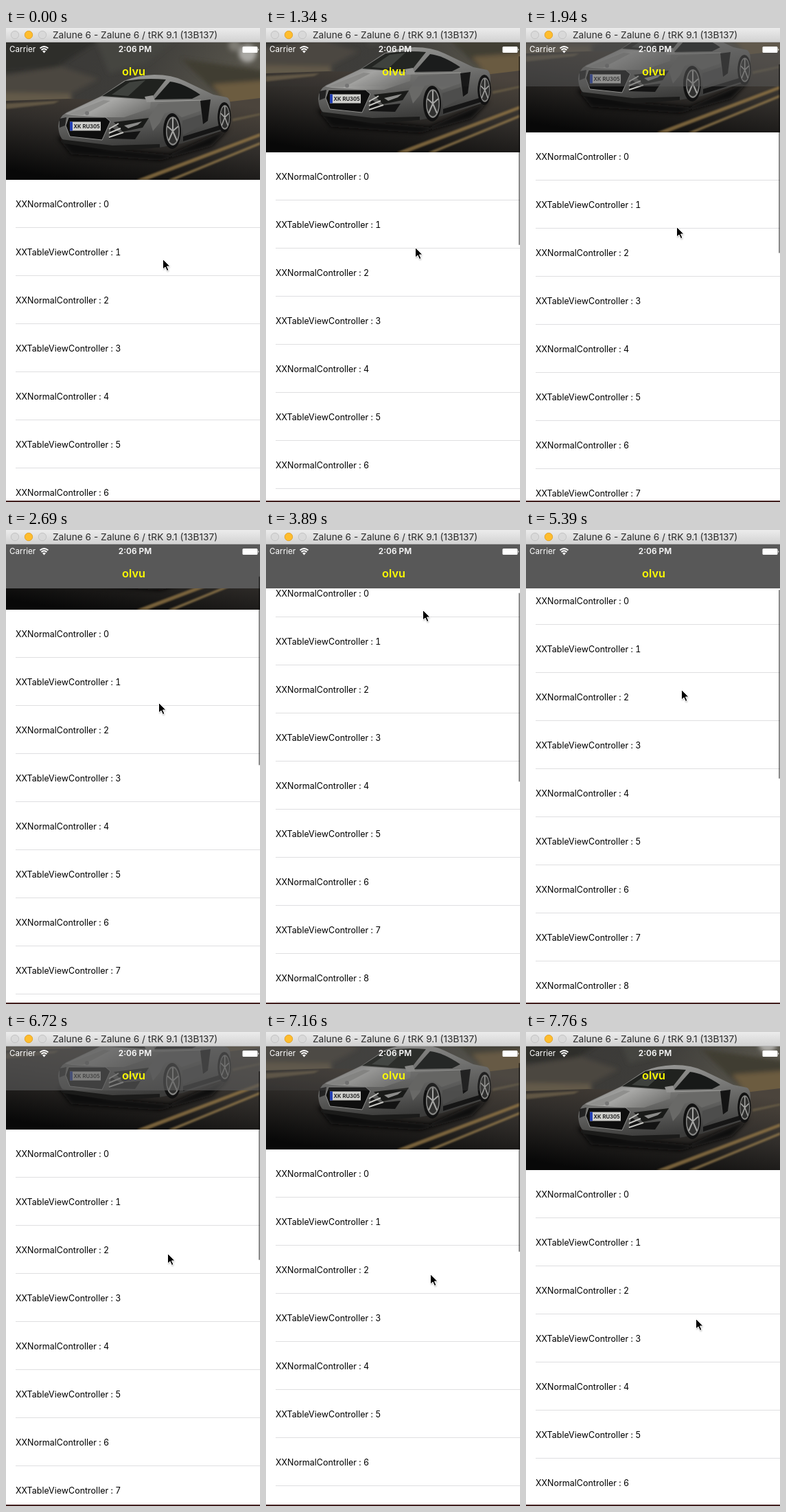
An HTML page for the animation above (8000 ms loop, 370 by 690 pixels).

```html
<!DOCTYPE html>
<html lang="en">
<head>
<meta charset="utf-8">
<title>Fading navigation bar</title>
<style>
  html, body { margin: 0; width: 100%; height: 100%; overflow: hidden; background: #fff; }
  svg { display: block; width: 370px; height: 690px; font-family: Inter, Roboto, sans-serif; }
  #rows { font-size: 12.5px; font-feature-settings: "tnum"; }
</style>
</head>
<body>
<svg viewBox="0 0 370 690">
  <defs>
    <linearGradient id="chrome" x2="0" y2="1"><stop stop-color="#ececec"/><stop offset="1" stop-color="#d1d1d1"/></linearGradient>
    <linearGradient id="hill" x2="1" y2=".3"><stop stop-color="#3a3937"/><stop offset=".5" stop-color="#3d3c39"/><stop offset="1" stop-color="#5c594f"/></linearGradient>
    <linearGradient id="road" x1=".75" y1="0" x2=".25" y2="1"><stop stop-color="#4b443c"/><stop offset=".45" stop-color="#302d2a"/><stop offset="1" stop-color="#080808"/></linearGradient>
    <linearGradient id="paint" x2=".25" y2="1"><stop stop-color="#a0a09e"/><stop offset=".45" stop-color="#777775"/><stop offset="1" stop-color="#3c3c3b"/></linearGradient>
    <linearGradient id="hood" x2="1" y2=".5"><stop stop-color="#6f6f6e"/><stop offset=".5" stop-color="#a9a9a7"/><stop offset="1" stop-color="#777775"/></linearGradient>
    <filter id="soft" x="-20%" y="-20%" width="140%" height="140%"><feGaussianBlur stdDeviation="3"/></filter>
    <filter id="slight" x="-20%" y="-20%" width="140%" height="140%"><feGaussianBlur stdDeviation=".8"/></filter>
    <clipPath id="photo"><path d="M0 21H370V221H0Z"/></clipPath>
    <g id="wheel">
      <ellipse rx="13" ry="26" fill="#111"/>
      <ellipse cx="1" rx="10" ry="21" fill="#858583"/>
      <ellipse cx="1" rx="8.5" ry="18.5" fill="#30302f"/>
      <path d="M1 0V-19M1 0 9-7M1 0 7 14M1 0-5 14M1 0-7-7" stroke="#a5a5a3" stroke-width="2"/>
    </g>
  </defs>

  <path d="M0 0H370V690H0Z" fill="#fff"/>
  <g id="scroll">
    <g clip-path="url(#photo)">
      <path d="M0 21H370V221H0Z" fill="url(#hill)"/>
      <g filter="url(#soft)">
        <path d="M-5 15H140L75 57-5 66Z" fill="#2f2e2c"/>
        <path d="M-5 70 80 56 135 74 90 98-5 94Z" fill="#4b4740"/>
        <path d="M130 15H250L205 52 150 66Z" fill="#45443f"/>
        <path d="M255 45 375 62V102L310 98Z" fill="#413c30"/>
        <path d="M300 82 380 76V108L325 112Z" fill="#6c5b41"/>
        <circle cx="352" cy="37" r="13" fill="#aaa9a5"/>
        <circle cx="333" cy="25" r="9" fill="#7d7a73"/>
        <path d="M-5 94 95 96V110L-5 112Z" fill="#645a4a"/>
      </g>
      <path d="M0 106 90 103 320 108 370 102V221H0Z" fill="url(#road)"/>
      <g filter="url(#slight)">
        <path d="M0 110 78 106 70 110 0 118Z" fill="#8b7b5b" opacity=".5"/>
        <path d="M190 221 370 153V158L206 221Z" fill="#977a47" opacity=".75"/>
        <path d="M236 221 370 166V170L246 221Z" fill="#9f8250" opacity=".7"/>
        <path d="M330 132 370 124V127L330 136Z" fill="#80704f" opacity=".5"/>
      </g>
      <path d="M74 158 150 176 238 184 326 145 300 172 225 193 95 184Z" fill="#0a0909" filter="url(#soft)"/>

      <path d="M76 143Q77 129 88 123L139 99 172 77Q190 69 216 68 242 68 260 77L302 97 322 101Q329 105 326 126L323 147 256 168 223 174 158 176 86 165Q77 160 76 143Z" fill="url(#paint)"/>
      <path d="M86 125 138 100 211 105 210 117 172 130 145 130 96 127Z" fill="url(#hood)"/>
      <path d="M88 126 142 105 152 106 112 127Z" fill="#8f8f8d"/>
      <path d="M140 99 174 77Q203 72 233 75L210 104Z" fill="#20221f"/>
      <path d="M154 97 180 79 203 76 178 99Z" fill="#3e413d"/>
      <path d="M216 104 239 78Q258 80 283 97L271 103Z" fill="#171918"/>
      <path d="M222 110 281 106 285 120 256 130 244 121 231 124 224 138 214 150 208 130Z" fill="#696967"/>
      <path d="M257 135 284 126 286 141 258 156Z" fill="#4d4d4c"/>
      <path d="M208 107 284 105" stroke="#a5a5a2" fill="none"/>
      <path d="M283 106 298 104 294 135 287 140Z" fill="#131313"/>
      <path d="M258 165 322 145 320 139 258 158Z" fill="#151515"/>
      <path d="M202 100 214 98 217 106 205 108Z" fill="#949492"/>
      <path d="M91 130 145 130 152 136 140 163 93 158 87 142Z" fill="#0e0e0e" stroke="#929290"/>
      <path d="M157 137 208 131 199 145 170 151Z" fill="#191a18"/>
      <path d="M172 142 198 136 192 141 178 146Z" fill="#8c8c8a"/>
      <path d="M78 132 88 130 86 142 78 145Z" fill="#222"/>
      <path d="M153 144 167 153 196 150 188 162 150 161Z" fill="#131313"/>
      <path d="M150 147 164 139M150 153 167 146M150 159 171 152" stroke="#c6c6c2" stroke-width="2"/>
      <path d="M80 162 155 171 224 169 224 174 158 179 84 168Z" fill="#1b1b1a"/>
      <circle cx="118" cy="124" r="3" fill="#777"/>
      <use href="#wheel" x="242" y="150"/>
      <use href="#wheel" transform="translate(318 130) scale(.75 .85)"/>
      <path d="M93 136.500H138V149.500H93Z" fill="#cfcfcc"/>
      <path d="M93 136.500H97V149.500H93Z" fill="#2440b5"/>
      <text x="98.500" y="146" font-size="7.700" font-weight="600" fill="#111">XK RU305</text>
    </g>
    <g id="rows"></g>
  </g>

  <rect id="bar" y="21" width="370" height="64" fill="#585858"/>
  <g fill="#fff">
    <text x="5" y="35.300" font-size="11.700">Carrier</text>
    <text x="188" y="35.300" font-size="11.900" font-weight="600" text-anchor="middle">2:06 PM</text>
    <path d="M49.500 29.500Q55.500 24.500 61.500 29.500M51.500 32Q55.500 28.500 59.500 32" fill="none" stroke="#fff" stroke-width="1.700"/>
    <path d="M53 33.700Q55.500 31.700 58 33.700L55.500 36.400Z"/>
    <rect x="344.500" y="27" width="22" height="9" rx="1.500"/>
    <path d="M367.300 30Q369.500 31.500 367.300 33Z"/>
  </g>
  <text x="186" y="69" font-size="16.300" font-weight="600" text-anchor="middle" fill="#ff0">olvu</text>
  <rect id="indicator" x="368" width="2" height="275" rx="1" fill="#000"/>

  <path d="M0 0H370V21H0Z" fill="url(#chrome)"/>
  <path d="M0 20.500H370" stroke="#b4b4b4"/>
  <g stroke="#c4c4c4" fill="#d9d9d9">
    <circle cx="13" cy="10" r="5.700"/>
    <circle cx="33" cy="10" r="5.700" fill="#ffbd2e" stroke="#e2a52f"/>
    <circle cx="53" cy="10" r="5.700"/>
  </g>
  <text x="68" y="15.200" font-size="13.700" fill="#2b2b2b">Zalune 6 - Zalune 6 / tRK 9.1 (13B137)</text>
  <path d="M0 688H370V690H0Z" fill="#42201f"/>

  <g id="cursor">
    <path d="M.5.5V15L4 12 6.500 17.500 9 16.500 6.500 11H11Z" fill="#000" opacity=".3" transform="translate(.5 1.500)" filter="url(#slight)"/>
    <path d="M.5.5V15L4 12 6.500 17.500 9 16.500 6.500 11H11Z" fill="#000" stroke="#fff"/>
  </g>
</svg>
<script>
const DURATION = 8000, TICK = 149.4;
const $ = id => document.getElementById(id);
const scroll = $('scroll'), bar = $('bar'), indicator = $('indicator'), cursor = $('cursor');

// [tick, scroll offset, pointer x, pointer y]
const KEYS = [
  [0, 0, 228, 336], [1, 0, 222, 355], [2, 0, 217, 369], [4, 0, 217, 369],
  [5, 4, 217, 355], [9, 40, 217, 319], [18, 105, 222, 251], [20, 112, 223, 244],
  [21, 146, 225, 204], [23, 152, 228, 129], [25, 152, 228, 129],
  [26, 164, 228, 116], [29, 205, 228, 76], [32, 205, 228, 171],
  [36, 153, 226, 232], [38, 125, 227, 261], [39, 125, 227, 261],
  [40, 120, 229, 277], [45, 79, 235, 322], [49, 20, 243, 381], [52, 20, 247, 417]
];

$('rows').innerHTML = Array.from({ length: 10 }, (_, i) => {
  const y = 221 + 70 * i, kind = i % 2 ? 'TableView' : 'Normal';
  return `<text x="14" y="${y + 39.5}">XX${kind}Controller : ${i}</text>
    <path d="M14 ${y + 69.5}H370" stroke="#dfdfe1"/>`;
}).join('');

const clamp = v => Math.max(0, Math.min(1, v));

function pose(tick) {
  const next = KEYS.findIndex(key => key[0] > tick);
  if (next < 0) return KEYS[KEYS.length - 1].slice(1);
  const a = KEYS[next - 1], b = KEYS[next];
  const f = (tick - a[0]) / (b[0] - a[0]);
  return [1, 2, 3].map(i => Math.round(a[i] + (b[i] - a[i]) * f));
}

function draw(ms) {
  const tick = Math.floor((ms % DURATION + 10) / TICK);
  const [offset, x, y] = pose(tick);
  scroll.setAttribute('transform', `translate(0 ${-offset})`);
  bar.setAttribute('opacity', clamp((offset - 36) / 64));
  indicator.setAttribute('y', 24.7 + offset * 0.408);
  indicator.setAttribute('opacity', tick < 5 ? 0 : 0.45 * clamp((52 - tick) / 2));
  cursor.setAttribute('transform', `translate(${x} ${y})`);
}

function frame(now) {
  draw(now);
  requestAnimationFrame(frame);
}
draw(0);
requestAnimationFrame(frame);
</script>
</body>
</html>
```
